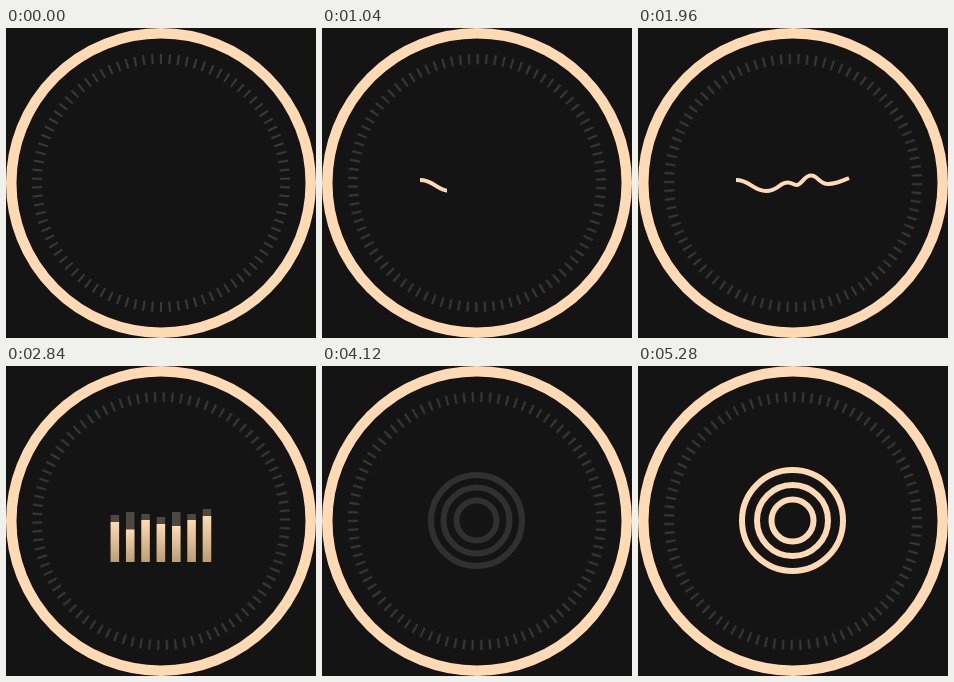
Write an HTML page that moves like this. It is 310 by 310 pixels and loops after 5.32 s.

```html
<!DOCTYPE html>
<html lang="en">
<head>
<meta charset="utf-8">
<title>Dial</title>
<style>
  html, body { margin: 0; width: 100%; height: 100%; overflow: hidden; background: #141414; }
  svg { display: block; width: 310px; height: 310px; }
  svg * { animation: 5320ms linear infinite; }
  circle, .wave { fill: none; }
  .rim { stroke: #ffdab3; stroke-width: 10.5; }
  .ticks {
    stroke: #393939; stroke-width: 10;
    stroke-dasharray: .23 .77; stroke-dashoffset: .115;
    transform-origin: 155px 155px; animation-name: turn;
  }
  .scene { opacity: 0; animation-timing-function: step-end; }
  .s1 { animation-name: first; }
  .s2 { animation-name: second; }
  .s3 { animation-name: third; }
  .wave { stroke: #ffdab3; stroke-width: 4; }
  .wipe { transform-origin: 98px 0; animation-name: wipe; }
  .bar, .ghost { transform-box: fill-box; transform-origin: 50% 100%; }
  .bar { fill: url(#fade); animation-name: bounce; }
  .ghost { fill: #4f483e; animation-name: trail; }
  .ring { stroke-width: 6; stroke: #303030; }
  .rings { animation-name: appear; }
  .r1 { animation-name: grow1, light1; }
  .r2 { animation-name: grow2, light2; }
  .r3 { animation-name: grow3, light3; }

  @keyframes turn { from { transform: rotate(-90deg); } to { transform: rotate(-170deg); } }

  @keyframes first { 0% { opacity: 0; } 14.286% { opacity: 1; } 42.857%, 100% { opacity: 0; } }
  @keyframes second { 0% { opacity: 0; } 42.857% { opacity: 1; } 71.43%, 100% { opacity: 0; } }
  @keyframes third { 0% { opacity: 0; } 71.43%, 100% { opacity: 1; } }

  @keyframes wipe {
    0%, 14.286% { transform: scaleX(0); }
    36.84%, 100% { transform: scaleX(1); }
  }
  @keyframes bounce {
    0%, 42.857% { transform: scaleY(0); animation-timing-function: ease-out; }
    49% { transform: scaleY(calc(1.06 - var(--d))); animation-timing-function: ease-in-out; }
    53.383% { transform: scaleY(1); animation-timing-function: ease-in-out; }
    58% { transform: scaleY(calc(1 + var(--d))); animation-timing-function: ease-in-out; }
    63% { transform: scaleY(calc(1 - var(--d))); animation-timing-function: ease-in-out; }
    68% { transform: scaleY(calc(1 + var(--d) * .7)); animation-timing-function: ease-in-out; }
    71.43%, 100% { transform: scaleY(.9); }
  }
  @keyframes trail {
    0%, 42.857% { transform: scaleY(0); animation-timing-function: ease-out; }
    49%, 56% { transform: scaleY(1); animation-timing-function: ease-in-out; }
    64% { transform: scaleY(calc(1 + var(--d) * .5)); animation-timing-function: ease-in-out; }
    71.43%, 100% { transform: scaleY(1); }
  }
  @keyframes appear { 0%, 71.43% { opacity: 0; } 75%, 100% { opacity: 1; } }
  @keyframes grow1 { 0%, 77.444% { r: 20px; } 99.248%, 100% { r: 21px; } }
  @keyframes grow2 { 0%, 77.444% { r: 33px; } 99.248%, 100% { r: 35.5px; } }
  @keyframes grow3 { 0%, 77.444% { r: 45.5px; } 99.248%, 100% { r: 50.5px; } }
  @keyframes light1 { 0%, 78.5% { stroke: #303030; } 83%, 100% { stroke: #ffdab3; } }
  @keyframes light2 { 0%, 83% { stroke: #303030; } 88%, 100% { stroke: #ffdab3; } }
  @keyframes light3 { 0%, 88% { stroke: #303030; } 93%, 100% { stroke: #ffdab3; } }
</style>
</head>
<body>
<svg viewBox="0 0 310 310">
  <defs>
    <linearGradient id="fade" x1="0" y1="0" x2="0" y2="1">
      <stop offset="0" stop-color="#ffdab3"/>
      <stop offset="1" stop-color="#bd9d75"/>
    </linearGradient>
    <clipPath id="reveal"><rect class="wipe" x="98" y="130" width="114" height="50"/></clipPath>
  </defs>
  <circle class="rim" cx="155" cy="155" r="149.75"/>
  <circle class="ticks" cx="155" cy="155" r="124" pathLength="90"/>
  <g class="scene s1" clip-path="url(#reveal)">
    <path class="wave" d="M98 152C112 152 115 163 128 163C140 163 141 154.5 150 154.5C154 154.5 155 157 158.5 157C164 157 166 147.5 173 147.5C180 147.5 181 156 190 156C198 156 204 153 211 150"/>
  </g>
  <g class="scene s2" id="bars"></g>
  <g class="scene s3">
    <g class="rings">
      <circle class="ring r1" cx="154.5" cy="154.5" r="20"/>
      <circle class="ring r2" cx="154.5" cy="154.5" r="33"/>
      <circle class="ring r3" cx="154.5" cy="154.5" r="45.5"/>
    </g>
  </g>
</svg>
<script>
  const base = 196;
  const tops = [156, 163.5, 154, 158, 160, 154, 150];
  const peaks = [149, 146, 148, 151, 146, 148, 143];
  const group = document.getElementById('bars');

  function addBar(name, i, top) {
    const bar = document.createElementNS('http://www.w3.org/2000/svg', 'rect');
    const box = { class: name, x: 104.6 + i * 15.35, y: top, width: 8.5, height: base - top };
    for (const key in box) bar.setAttribute(key, box[key]);
    bar.style.setProperty('--d', (0.16 * Math.cos(i * 2.2)).toFixed(3));
    group.append(bar);
  }

  tops.forEach((top, i) => {
    addBar('ghost', i, peaks[i]);
    addBar('bar', i, top);
  });
</script>
</body>
</html>
```
